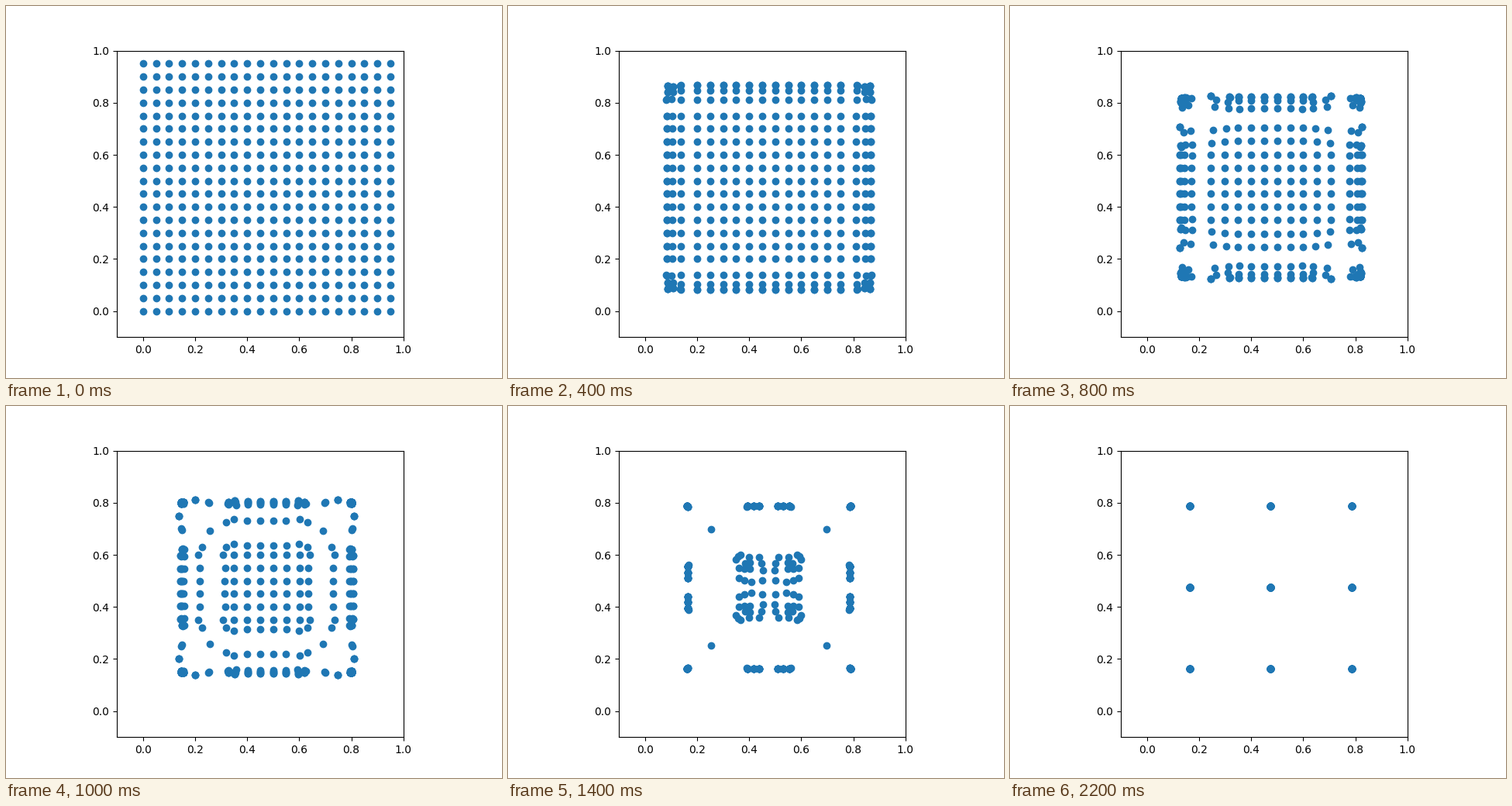
A matplotlib script for the animation above (2400 ms loop, 640 by 480 pixels).

```python
import numpy as np
import matplotlib.pyplot as plt
from matplotlib.animation import FuncAnimation

FRAMES = 12
INTERVAL = 200
RADIUS = 0.125


def shift(pts):
    """Move every point to the mean of its neighbours within RADIUS."""
    diff = pts[:, None, :] - pts[None, :, :]
    near = (diff ** 2).sum(axis=2) <= RADIUS ** 2
    return near @ pts / near.sum(axis=1, keepdims=True)


ticks = np.arange(20) * 0.05
gx, gy = np.meshgrid(ticks, ticks)
states = [np.column_stack([gx.ravel(), gy.ravel()])]
while len(states) < FRAMES:
    states.append(shift(states[-1]))

fig, ax = plt.subplots(figsize=(6.4, 4.8), dpi=100)
ax.set_aspect("equal")
ax.set_xlim(-0.1, 1)
ax.set_ylim(-0.1, 1)
ax.set_xticks(np.arange(6) * 0.2)
ax.set_yticks(np.arange(6) * 0.2)
dots, = ax.plot([], [], "o", color="#1f77b4")


def update(i):
    dots.set_data(*states[i].T)
    return dots,


anim = FuncAnimation(fig, update, frames=FRAMES, interval=INTERVAL,
                     repeat=True, repeat_delay=0)
plt.show()
```
